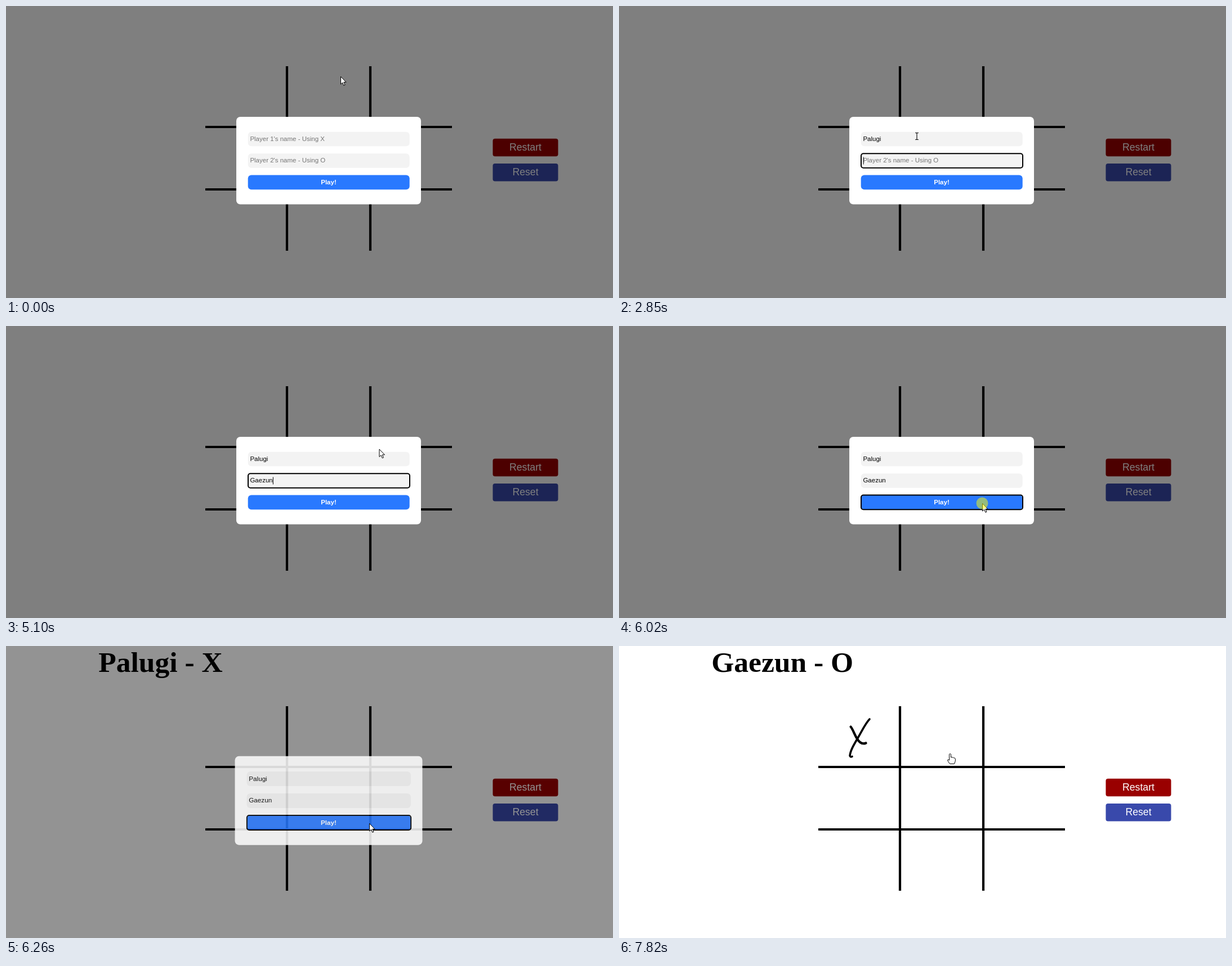
An HTML page for the animation above (7.99 s loop, 1078 by 519 pixels).

```html
<!DOCTYPE html>
<html lang="en">
<head>
<meta charset="utf-8">
<title>Tic-tac-toe</title>
<style>
  html, body { margin: 0; width: 100%; height: 100%; overflow: hidden; background: #fff; }
  svg { display: block; width: 100%; height: 100%; }
  text { white-space: pre; }
  .ui { font-family: "Liberation Sans", Arial, sans-serif; font-size: 11.5px; }
  .big { font-family: "Liberation Sans", Arial, sans-serif; font-size: 17.7px; fill: #fff; text-anchor: middle; }
  .list { font-family: "Noto Sans", "Open Sans", sans-serif; font-size: 10.5px; }
  .title { font-family: "Liberation Serif", "Times New Roman", serif; font-size: 51.5px; font-weight: bold; }
  .play { font-weight: bold; fill: #fff; text-anchor: middle; }
  .pen { fill: none; stroke: #000; stroke-linecap: round; stroke-linejoin: round; }
</style>
</head>
<body>
<svg viewBox="0 0 1078 519">
  <defs>
    <filter id="shadow" x="-5%" y="-10%" width="110%" height="125%">
      <feDropShadow dx="0" dy="1" stdDeviation="1" flood-opacity=".35"/>
    </filter>
  </defs>

  <rect width="1078" height="519" fill="#fff"/>
  <text id="title" class="title" x="164.3" y="46"></text>
  <path d="M499 107V435M647 107V435M354 215H792M354 326H792" stroke="#000" stroke-width="4.2"/>
  <g id="mark" class="pen">
    <path d="M445 130C438 137 432 150 425 162C418 174 411 185 410 195Q411 198 414 196.5" stroke-width="3.6"/>
    <path d="M411.500 143.500C417 150 420 165 428 171Q433 175 438.500 172.500" stroke-width="4.2"/>
  </g>
  <rect x="864.500" y="235.800" width="116" height="31.400" rx="4" fill="#900"/>
  <text class="big" x="922.500" y="257">Restart</text>
  <rect x="864.500" y="280" width="116" height="31.400" rx="4" fill="#3949ab"/>
  <text class="big" x="922.500" y="301.300">Reset</text>

  <rect id="shade" width="1078" height="519"/>

  <g id="modal" class="ui">
    <rect x="409" y="197" width="328" height="155.500" rx="7" fill="#fff"/>
    <rect x="429.700" y="223.700" width="287" height="25.600" rx="6" fill="#f3f3f3"/>
    <rect x="429.700" y="262.200" width="287" height="25.600" rx="6" fill="#f3f3f3"/>
    <rect x="429.700" y="300.600" width="287" height="25.600" rx="6" fill="#2979ff"/>
    <text id="name1" x="433.400" y="240.300"></text>
    <text id="name2" x="433.400" y="278.400"></text>
    <text class="play" x="573" y="317">Play!</text>
    <rect id="ring" x="430" width="287" height="25.600" rx="4" fill="none" stroke="#000" stroke-width="2"/>
    <rect id="caret" width="1" height="13"/>
  </g>

  <g id="list" class="list">
    <path id="sheet" fill="#fff" filter="url(#shadow)"/>
    <text id="item0" x="440"></text>
    <text id="item1" x="440"></text>
    <text id="item2" x="440"></text>
  </g>

  <g id="cursor">
    <path id="arrow" d="M.5.5V14L3.600 11.200L5.800 16.300L8 15.300L5.800 10.400H10Z" fill="#fff" stroke="#000"/>
    <path id="beam" class="pen" d="M-2.500 .5H-.8L0 1L.8 .5H2.500M0 1V12M-2.500 12.500H-.8L0 12L.8 12.500H2.500" stroke-width="1.100"/>
    <path id="hand" d="M-1.500 1.500Q0-.8 1.500 1.500V7Q3 5.800 4.300 7.300Q5.800 6.300 6.800 8Q9 7.500 9.300 9.500V13.500L7.500 18.500H-.5L-4.500 12.500Q-5 10-1.500 12Z" fill="#fff" stroke="#000"/>
  </g>
  <circle id="click" r="10.500" fill="#ff0" opacity=".5"/>
</svg>

<script>
const LOOP = 7990, TICK = 75, BLINK = 500;
const $ = Object.fromEntries([...document.querySelectorAll("[id]")].map(e => [e.id, e]));

const FOCUS1 = 910, FOCUS2 = 2850, FOCUS_PLAY = 6020, START = 6190, MARKED = 7110;
const fields = [
  { node: $.name1, hint: "Player 1's name - Using X", name: "Palugi", top: 223.7,
    keys: [1920, 2070, 2220, 2390, 2470, 2620], focus: FOCUS1 },
  { node: $.name2, hint: "Player 2's name - Using O", name: "Gaezun", top: 262.2,
    keys: [3550, 3940, 4090, 4240, 4410, 4640], focus: FOCUS2 }
];

// Pointer moves: [time, x, y]
const moves = [
  [[0, 594, 125], [150, 619, 104], [300, 607, 140], [450, 580, 185], [600, 528, 214]],
  [[830, 529, 225]],
  [[5020, 545, 225], [5170, 780, 212], [5320, 1060, 207], [5470, 920, 235], [5620, 740, 285], [5770, 649, 312]],
  [[5870, 645, 315]],
  [[6190, 645, 315], [6265, 668, 312], [6340, 699, 300], [6490, 690, 255], [6715, 560, 195], [6940, 440, 168]],
  [[7190, 440, 168], [7340, 510, 182], [7490, 584, 194]],
  [[7670, 586, 193], [7820, 588, 191]]
];
const clicks = [[830, 1320, 528, 225], [FOCUS_PLAY, START, 645, 315], [7030, 7260, 440, 168]];
const fade = [[START, 0.15], [6265, 0.8], [6340, 0.976], [6415, 1]];

const show = (el, on) => el.setAttribute("visibility", on ? "visible" : "hidden");
const set = (el, attrs) => { for (const k in attrs) el.setAttribute(k, attrs[k]); };

function sample(track, t) {
  const t0 = track[0][0];
  t = t0 + Math.floor((t - t0) / TICK) * TICK;
  const i = track.findIndex(k => k[0] > t);
  if (i < 0) return track[track.length - 1].slice(1);
  if (i === 0) return track[0].slice(1);
  const a = track[i - 1], b = track[i], u = (t - a[0]) / (b[0] - a[0]);
  return a.slice(1).map((v, n) => v + (b[n + 1] - v) * u);
}

function drawFields(t) {
  for (const f of fields) {
    const typed = f.name.slice(0, f.keys.filter(k => k <= t).length);
    f.node.textContent = typed || f.hint;
    f.node.setAttribute("fill", typed ? "#000" : "#757575");
    f.width = typed ? f.node.getComputedTextLength() : 0;
  }
  const active = t < FOCUS1 || t >= FOCUS_PLAY ? null : t < FOCUS2 ? fields[0] : fields[1];
  show($.ring, t >= FOCUS1 && t < 6415);
  $.ring.setAttribute("y", active ? active.top : 300.6);
  let lit = false;
  if (active) {
    const last = Math.max(active.focus, ...active.keys.filter(k => k <= t));
    lit = Math.floor((t - last) / BLINK) % 2 === 0;
    set($.caret, { x: 433.6 + active.width, y: active.top + 6.3 });
  }
  show($.caret, lit);
}

function drawList(t) {
  const first = t >= 1000 && t < 1920;
  const open = first || (t >= 3630 && t < 3940);
  $.list.style.display = open ? "" : "none";
  if (!open) return;
  const items = first ? ["aaa", "aa", "aaaa"] : ["gg"];
  const top = first ? 250.5 : 289;
  const bottom = top + 12.5 + 30.8 * items.length;
  $.sheet.setAttribute("d", `M430 ${top}H717V${bottom - 3}q0 3-3 3H433q-3 0-3-3Z`);
  [$.item0, $.item1, $.item2].forEach((el, i) => {
    el.textContent = items[i] || "";
    el.setAttribute("y", top + 26.2 + 30.8 * i);
  });
}

function drawPointer(t) {
  const [x, y] = sample(moves.filter(m => m[0][0] <= t).pop(), t);
  const beam = t >= 830 && t < 5095, hand = t >= 6415;
  $.cursor.setAttribute("transform", `translate(${x} ${y})`);
  show($.beam, beam);
  show($.hand, hand);
  show($.arrow, !beam && !hand);
  const hit = clicks.find(c => t >= c[0] && t < c[1]);
  show($.click, hit);
  if (hit) set($.click, { cx: hit[2], cy: hit[3] });
}

function draw(t) {
  const p = t < START ? 0 : sample(fade, t)[0];
  $.shade.setAttribute("opacity", 0.5 * (1 - p));
  set($.modal, {
    opacity: 1 - p,
    transform: `translate(573 274.7) scale(${1 + 0.1 * p}) translate(-573 -274.7)`
  });
  $.modal.style.display = p < 1 ? "" : "none";
  $.title.textContent = t < START ? "" : t < MARKED ? fields[0].name + " - X" : fields[1].name + " - O";
  show($.mark, t >= MARKED);
  drawFields(t);
  drawList(t);
  drawPointer(t);
}

const begin = performance.now();
function loop() {
  draw((performance.now() - begin) % LOOP);
  requestAnimationFrame(loop);
}
loop();
</script>
</body>
</html>
```
